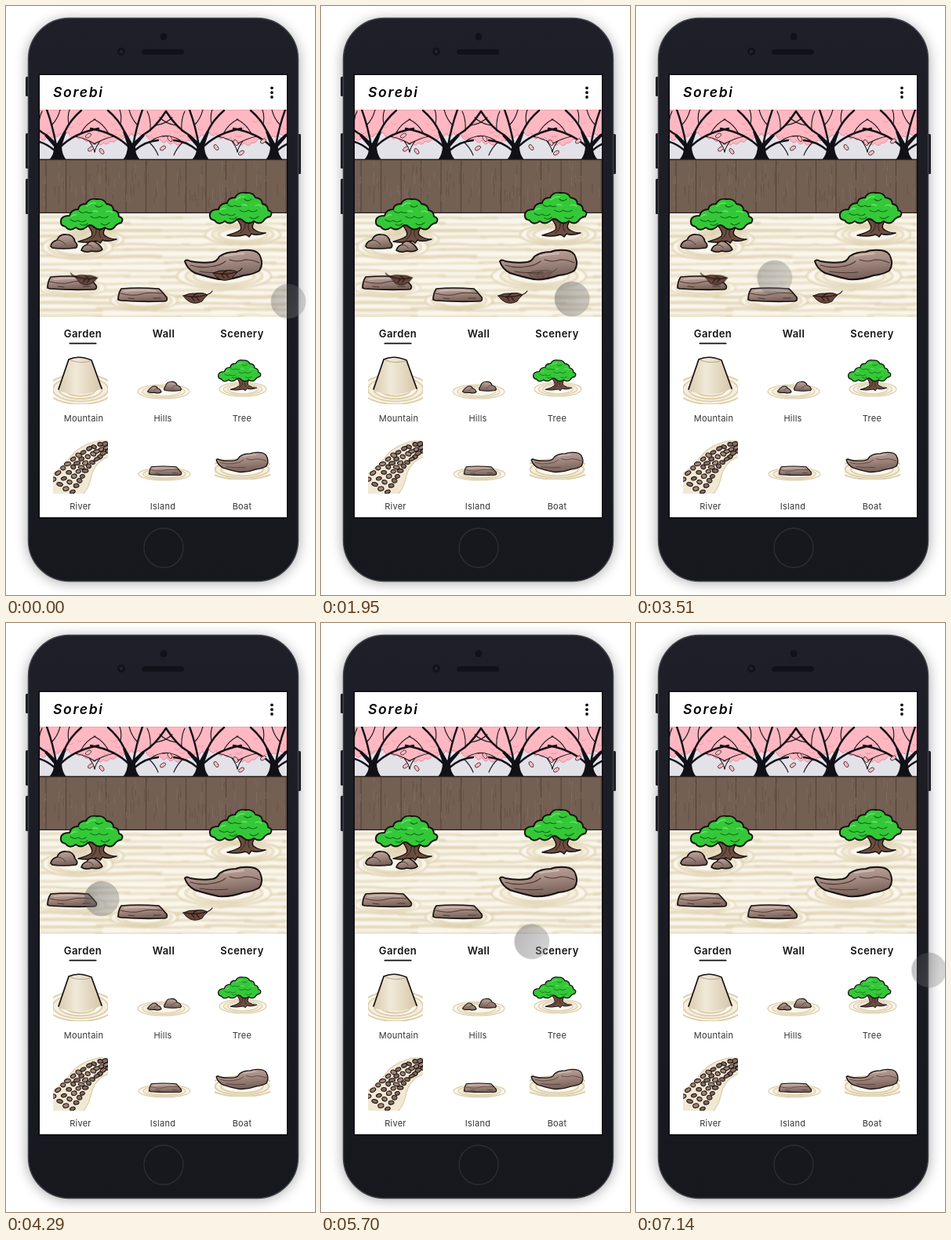
Animation of 394 by 750 pixels, one loop 7.17 s. Source, as an HTML page:

```html
<!DOCTYPE html>
<html lang="en">
<head>
<meta charset="utf-8">
<title>Garden app</title>
<style>
html, body { margin: 0; width: 100%; height: 100%; overflow: hidden; background: #fff; }
svg { display: block; width: 394px; height: 750px; }
text { font-family: Inter, "Open Sans", sans-serif; }
.title { font-size: 17.5px; font-weight: 600; font-style: italic; letter-spacing: 1.7px; }
.tab { font-size: 13px; font-weight: 600; letter-spacing: .45px; text-anchor: middle; fill: #111; }
.label { font-size: 11px; letter-spacing: .25px; text-anchor: middle; fill: #333; }
.ink { stroke: #15100e; stroke-linejoin: round; stroke-linecap: round; }
.line { fill: none; stroke-linecap: round; stroke-linejoin: round; }
</style>
</head>
<body>
<svg viewBox="0 0 394 750">
  <defs>
    <linearGradient id="body" x2="0" y2="1">
      <stop stop-color="#1e1f28"/><stop offset="1" stop-color="#17181e"/>
    </linearGradient>
    <linearGradient id="rock" x2="0.25" y2="1">
      <stop stop-color="#c2aaa1"/><stop offset=".5" stop-color="#a58b82"/><stop offset="1" stop-color="#79635b"/>
    </linearGradient>
    <linearGradient id="cone">
      <stop stop-color="#d9cbb0"/><stop offset=".4" stop-color="#f1e9d8"/><stop offset="1" stop-color="#d5c6a9"/>
    </linearGradient>
    <linearGradient id="touch" x2="1" y2=".4">
      <stop stop-color="#4c4c50"/><stop offset="1" stop-color="#88888a"/>
    </linearGradient>
    <filter id="shade" x="-15%" y="-10%" width="130%" height="120%"><feGaussianBlur stdDeviation="8"/></filter>
    <filter id="soft"><feGaussianBlur stdDeviation=".8"/></filter>
    <clipPath id="view"><rect x="43" y="132" width="315" height="264"/></clipPath>
    <clipPath id="mountBox"><rect x="60" y="440" width="70" height="67"/></clipPath>
    <clipPath id="riverBox"><rect x="60" y="553" width="70" height="68"/></clipPath>
    <clipPath id="boatBox"><rect x="266" y="560" width="71" height="43"/></clipPath>

    <g id="tree">
      <path class="ink" stroke-width="1.4" fill="#6b4d40" d="M-8-20L3-20Q7-14 11-20L17-17Q10-8 16-5Q22-1 30-1Q18 3 12 0L9 4Q5 0 1 2Q-7 4-19 2Q-8-1-2-5Q1-10-8-20Z"/>
      <path class="line" stroke="#2f211b" d="M4-13Q5-6-2-1M9-14Q6-7 10-3"/>
      <path class="ink" stroke-width="1.9" fill="#34c838" d="M-41-25Q-40-31-30-31Q-28-39-19-39Q-18-46-9-46Q-5-54 5-52Q14-53 17-46Q26-45 26-38Q33-37 33-30Q40-28 36-22Q30-21 27-16Q22-11 15-16Q8-11 2-16Q-4-22-9-16Q-16-11-22-16Q-30-10-35-17Q-42-18-41-25Z"/>
      <path class="line" stroke="#126f1b" stroke-width="1.2" d="M-18-37q4 4 9 1q5 3 9 0M3-44q4 4 9 0M-29-26q5 4 10 1q5 4 10 0M-3-30q6 4 11 0q6 4 11 0M-16-20q5 3 9-1M10-21q5 4 11-1"/>
      <path class="line" stroke="#6fe56d" stroke-width="1.3" d="M-8-43q5-5 11-4M-28-30q4-3 7-2M17-36q5-2 8 1M-1-36q4-2 7 0"/>
    </g>
    <g id="boat">
      <path class="ink" stroke-width="2" fill="url(#rock)" d="M-49-6Q-47-9-42-6Q-28-3-14-5Q-8-6-5-12Q3-18 16-18Q23-21 35-20Q46-19 48-10Q51-1 46 6Q38 11 26 12Q10 18-6 17Q-24 13-36 9Q-46 4-49-6Z"/>
      <path class="line" stroke="#4b3832" stroke-width="1.1" d="M-42-1Q-30 3-17 1Q-4 0 3-6M8-8Q18-4 28-8Q38-8 46-4M-30 7Q-12 10 6 8"/>
      <path class="line" stroke="#d9c6bd" stroke-width="2.4" opacity=".7" d="M2-13Q13-15 26-16"/>
    </g>
    <g id="island">
      <path class="ink" stroke-width="1.7" fill="url(#rock)" d="M-31 6Q-31-2-27-8Q-6-10 21-8L25-4L31 3Q33 8 27 8Q-2 9-28 7Z"/>
      <path class="line" stroke="#4b3832" d="M-28-2Q-12 2-2-1T25-2M-18 4l8 1M14 4l9 0"/>
      <path class="line" stroke="#d8c6bd" stroke-width="1.6" opacity=".8" d="M-23-5Q-4-7 17-5"/>
    </g>
    <g id="hills">
      <path class="ink" stroke-width="1.7" fill="url(#rock)" d="M-33 5Q-32-1-25-3Q-22-11-13-10Q-4-10-2-1Q3 4-1 7Q-17 9-31 7Z"/>
      <path class="ink" stroke-width="1.6" fill="url(#rock)" d="M6 10Q8 4 13 3Q16-3 23-1Q30 3 33 9Q29 13 19 11Q12 14 6 10Z"/>
      <path class="line" stroke="#4b3832" d="M-25-3Q-18-3-14 3M13 3q6 0 8 4"/>
    </g>
    <g id="leaf">
      <path class="ink" stroke-width="1" fill="#69463b" d="M-19-1Q-11-5-3-4Q6-6 12-2Q7 2 5 6Q-3 10-10 7Q-15 5-19-1Z"/>
      <path class="line" stroke="#1d1210" stroke-width="1.2" d="M-17-1Q-3 2 10-2Q15-3 18-7M-9 0l4 5M-2 1l3 4M-6-1l4-3"/>
    </g>
    <g id="sakura" class="line" stroke="#111016">
      <path stroke="none" fill="#111016" d="M-11 64Q-4 56-5 47L-17 33L-14 31L-1 43L8 27L11 28L5 46Q5 57 11 64Z"/>
      <path stroke-width="2.4" d="M-15 32Q-30 24-44 2M-2 46Q-6 22-14 0M9 28Q16 13 30 1M3 48Q20 30 52 24M-4 52Q-18 40-34 39"/>
      <path stroke-width="1.1" d="M-31 20Q-44 18-52 10M-24 27Q-25 12-20 2M-8 20Q0 12 3 0M14 18Q12 8 15 0M22 34Q34 36 48 44M30 29Q36 18 48 12M-22 41Q-30 48-34 58M-26 39Q-38 32-48 34M40 40Q46 48 47 54"/>
    </g>
  </defs>

  <rect x="27" y="17" width="347" height="718" rx="54" fill="#777" opacity=".6" filter="url(#shade)"/>
  <g fill="#1d1e26">
    <rect x="25" y="90" width="5" height="25" rx="1.5"/><rect x="25" y="162" width="5" height="45" rx="1.5"/>
    <rect x="25" y="220" width="5" height="45" rx="1.5"/><rect x="371" y="163" width="5" height="51" rx="1.5"/>
  </g>
  <rect x="28.5" y="15.5" width="344" height="717" rx="52" fill="url(#body)" stroke="#3f4048" stroke-width="1.4"/>
  <g fill="#111219">
    <circle cx="201" cy="39" r="4.5"/><rect x="173" y="55" width="54" height="7" rx="3.5"/>
    <circle cx="147" cy="58" r="5"/><circle cx="147" cy="58" r="2.3" fill="#20222e"/>
  </g>
  <circle cx="201" cy="690" r="25" fill="#17181e" stroke="#2d2e36" stroke-width="1.3"/>
  <rect x="41.5" y="86.5" width="318" height="566" fill="#0c0c12"/>
  <rect x="43" y="88" width="315" height="563" fill="#fff"/>

  <text class="title" x="60" y="116">Sorebi</text>
  <g fill="#111"><circle cx="339" cy="104.3" r="1.9"/><circle cx="339" cy="110.2" r="1.9"/><circle cx="339" cy="116" r="1.9"/></g>

  <g clip-path="url(#view)">
    <rect x="43" y="132" width="315" height="64" fill="#e3e2e9"/>
    <g id="blossom"></g>
    <use href="#sakura" x="66" y="132"/>
    <use href="#sakura" transform="translate(160 132) scale(-1 1)"/>
    <use href="#sakura" x="248" y="132"/>
    <use href="#sakura" transform="translate(342 132) scale(-1 1)"/>
    <g id="petals"></g>
    <rect x="43" y="195" width="315" height="69" fill="#745f53"/>
    <g id="wall" class="line"></g>
    <path d="M43 195.5H358M43 263.5H358" stroke="#2b201b" stroke-width="1.5"/>
    <rect x="43" y="264" width="315" height="132" fill="#faf6ec"/>
    <g id="sand" class="line" stroke="#e2d5b6" filter="url(#soft)"></g>
    <g id="rings" filter="url(#soft)"></g>
    <use href="#tree" x="111" y="298"/>
    <use href="#tree" x="301" y="290"/>
    <use href="#hills" x="90" y="301"/>
    <use href="#boat" x="277" y="331"/>
    <use href="#island" x="84" y="353"/>
    <use href="#island" x="174" y="368"/>
    <g id="leaf1"><use href="#leaf" x="283" y="341"/></g>
    <g id="leaf2"><use href="#leaf" transform="translate(99 347) scale(-.92 .95)"/></g>
    <g id="leaf3"><use href="#leaf" x="245" y="370"/></g>
  </g>

  <g id="words"></g>
  <rect x="80.5" y="428.7" width="35" height="1.9" rx=".9" fill="#111"/>

  <g clip-path="url(#mountBox)">
    <g id="mountRings"></g>
    <path fill="url(#cone)" d="M80 450Q93 444 109 451L122 487Q97 500 67 490Z"/>
    <path class="line" stroke="#15100e" stroke-width="1.7" d="M67 488L80 450Q93 444 109 451L122 487"/>
    <path class="line" stroke="#b7a88c" d="M82 451Q95 456 108 452"/>
  </g>
  <g id="thumbRings"></g>
  <use href="#hills" transform="translate(202 485) scale(-.65 .65)"/>
  <use href="#tree" transform="translate(299 487) scale(.69)"/>
  <use href="#island" transform="translate(203 592) scale(.66)"/>
  <g clip-path="url(#boatBox)"><g id="boatRings"></g></g>
  <use href="#boat" transform="translate(301 582) scale(.67)"/>
  <g id="river" clip-path="url(#riverBox)">
    <path fill="#f1e8d4" stroke="#dccda9" stroke-width="1.2" d="M59 596Q72 588 84 572Q98 555 131 552V574Q114 580 109 598Q106 614 98 622H59Z"/>
  </g>

  <g id="cursor">
    <circle r="22" fill="url(#touch)" stroke="#55555a" stroke-width=".6"/>
  </g>
</svg>
<script>
const LOOP = 7170;
const $ = id => document.getElementById(id);
const add = (id, markup) => $(id).insertAdjacentHTML('beforeend', markup);

let seed = 11;
const rand = (lo = 0, hi = 1) => {
  seed = (seed * 16807) % 2147483647;
  return lo + (hi - lo) * seed / 2147483647;
};

const ellipse = (x, y, rx, ry, attrs) =>
  `<ellipse cx="${x}" cy="${y}" rx="${rx}" ry="${ry}" ${attrs}/>`;

// Raked sand: nested ellipses from the outside inwards.
function rings(id, x, y, rx, ry, count = 3) {
  for (let i = 0; i < count; i++) {
    const k = 1 - i * 0.18;
    add(id, ellipse(x, y, rx * k, ry * k, `fill="${i % 2 ? '#f6eedd' : '#fbf7ed'}" stroke="#dccda9" stroke-width="${ry > 11 ? 1.8 : 1.2}"`));
  }
}

function drawBlossom() {
  let d = 'M43 132V168';
  for (let x = 43; x < 358; x += 9) {
    const y = 168 + 6 * Math.sin((x - 92) / 14.5) + rand(-2, 2);
    d += `Q${x + 5} ${y + 7} ${x + 9} ${y}`;
  }
  add('blossom', `<path fill="#ffb8c1" stroke="#e58c9b" d="${d}V132Z"/>`);
  for (let i = 0; i < 36; i++) {
    const x = rand(45, 354), y = rand(146, 166);
    add('blossom', `<path class="line" stroke="#f199a7" d="M${x} ${y}q3 4 7 0"/>`);
  }
  const spots = [[108, 182], [122, 185], [105, 165], [209, 169], [200, 181], [268, 180], [300, 187], [293, 174], [328, 172]];
  spots.forEach(([x, y], i) => add('petals',
    ellipse(0, 0, 4, 2.3, `transform="translate(${x} ${y}) rotate(${i % 2 ? 55 : -35})" fill="#ffbcc4" stroke="#35252a" stroke-width=".8"`)));
}

function drawWall() {
  for (let x = 51; x < 358; x += 25.5)
    add('wall', `<path stroke="#4d3d35" stroke-width=".9" d="M${x} 197V263"/>`);
  for (let i = 0; i < 110; i++) {
    const x = rand(45, 356), y = rand(197, 246), h = rand(5, 16);
    add('wall', `<path stroke="${i % 2 ? '#645045' : '#826d61'}" stroke-width=".8" d="M${x} ${y}q${rand(-2, 2)} ${h / 2} 0 ${h}"/>`);
  }
}

function drawSand() {
  for (let y = 269; y < 396; y += 8.4) {
    for (let x = 36; x < 358;) {
      const w = rand(50, 130);
      add('sand', `<path stroke-width="${rand(2.2, 4.6)}" opacity="${rand(.6, 1)}" d="M${x} ${y + rand(-1.2, 1.2)}q${w / 4} ${rand(-2, 2)} ${w / 2} 0t${w / 2} 0"/>`);
      x += w - 6;
    }
  }
}

function drawStones() {
  for (let i = 0; i < 11; i++) {
    const t = i / 10, u = 1 - t;
    const x = u * u * 128 + 2 * u * t * 98 + t * t * 73;
    const y = u * u * 562 + 2 * u * t * 572 + t * t * 611;
    const dx = u * -30 + t * -25, dy = u * 10 + t * 39;
    const len = Math.hypot(dx, dy), half = 5 + 10 * t, n = t < .5 ? 3 : 4;
    for (let j = 0; j < n; j++) {
      const s = (j / (n - 1) * 2 - 1) * half;
      const px = x - dy / len * s + rand(-1, 1), py = y + dx / len * s + rand(-1, 1);
      add('river', ellipse(0, 0, rand(3, 4.2), rand(2.1, 2.8),
        `transform="translate(${px} ${py}) rotate(${rand(-30, 25)})" fill="${j % 2 ? '#a38579' : '#866c62'}" stroke="#1c1412" stroke-width="1.1"`));
    }
  }
}

function drawWords() {
  const put = (cls, word, x, y) => add('words', `<text class="${cls}" x="${x}" y="${y}">${word}</text>`);
  [['Garden', 98], ['Wall', 201], ['Scenery', 301]].forEach(([w, x]) => put('tab', w, x, 422));
  [['Mountain', 99], ['Hills', 200], ['Tree', 301]].forEach(([w, x]) => put('label', w, x, 529));
  [['River', 95], ['Island', 200], ['Boat', 301]].forEach(([w, x]) => put('label', w, x, 641));
}

drawBlossom();
drawWall();
drawSand();
[[110, 297, 40, 12], [302, 291, 48, 13], [91, 307, 45, 15], [278, 344, 60, 16], [85, 359, 42, 10], [176, 375, 43, 12]]
  .forEach(r => rings('rings', ...r));
rings('mountRings', 95, 488, 43, 19, 4);
[[201, 491, 33, 9], [302, 488, 30, 9], [202, 596, 33, 8]].forEach(r => rings('thumbRings', ...r));
rings('boatRings', 301, 590, 42, 13);
drawStones();
drawWords();

function play(id, frames) {
  $(id).animate(frames, { duration: LOOP, iterations: Infinity });
}

// time, x, y, opacity, easing towards the next stop
const stops = [
  [0, 360, 376, .34, 'linear'],
  [300, 360, 376, .42, 'ease-in-out'],
  [1000, 320, 373, .42, 'linear'],
  [2800, 320, 373, .42, 'ease-in'],
  [3510, 177, 346, .36, 'ease-out'],
  [3850, 122, 351, .42, 'linear'],
  [4350, 122, 351, .42, 'ease-in-out'],
  [5070, 267, 405, .4, 'linear'],
  [5650, 267, 405, .4, 'ease-in-out'],
  [6200, 373.5, 442, .36, 'linear'],
  [LOOP, 373.5, 442, .36, 'linear']
];
play('cursor', stops.map(([t, x, y, opacity, easing]) =>
  ({ offset: t / LOOP, transform: `translate(${x}px, ${y}px)`, opacity, easing })));

// Each leaf fades soon after the touch reaches it.
[['leaf1', 1850], ['leaf2', 4150], ['leaf3', 5450]].forEach(([id, t]) => play(id, [
  { offset: 0, opacity: 1 },
  { offset: t / LOOP, opacity: 1 },
  { offset: (t + 150) / LOOP, opacity: 0 },
  { offset: 1, opacity: 0 }
]));
</script>
</body>
</html>
```
